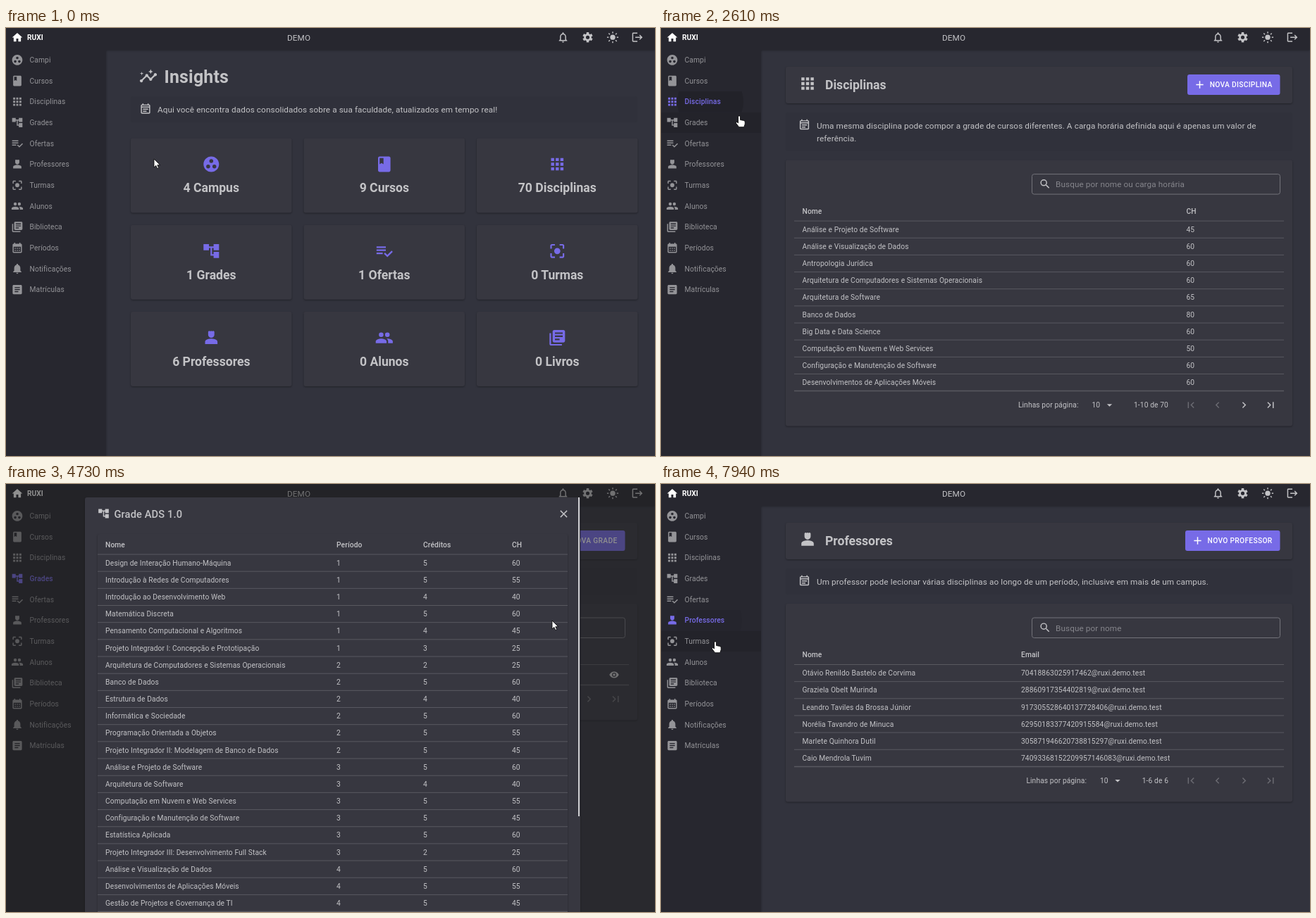
Write an HTML page that moves like this. It is 921 by 608 pixels and loops after 8000 ms.

```html
<!DOCTYPE html>
<html lang="pt-BR">
<head>
<meta charset="utf-8">
<title>Painel</title>
<style>
html, body { margin: 0; width: 100%; height: 100%; overflow: hidden; background: #32333d; }
#stage { display: block; width: 921px; height: 608px; font: 10.26px Roboto, sans-serif; fill: #c3c3c6; }
text { white-space: pre; }
.cell { letter-spacing: .01071em; }
.head { font-weight: 500; letter-spacing: .01071em; }
.brand { font-weight: 700; fill: #fff; }
.btn { font-weight: 500; letter-spacing: .02857em; fill: #fff; }
.body { font-size: 11.72px; letter-spacing: .00938em; }
.h6 { font-size: 14.65px; font-weight: 500; letter-spacing: .0075em; }
.h5 { font-size: 17.58px; font-weight: 700; }
.h4 { font-size: 24.91px; font-weight: 700; letter-spacing: .00735em; }
.mid { text-anchor: middle; }
.end { text-anchor: end; }
.card { fill: #373740; filter: drop-shadow(0 1px 1.2px rgba(0, 0, 0, .35)); }
.alert { fill: #30313b; }
.line { stroke: #fff; stroke-opacity: .17; }
.main { fill: #776be7; }
.dim { fill: #85858b; }
.off { fill: #6b6b72; }
.white { fill: #fff; }
.menu { fill: #949498; }
.menu .on { fill: #776be7; font-weight: 500; }
</style>
</head>
<body>
<svg id="stage" viewBox="0 0 921 608"></svg>
<script>
const SIZE = { body: 11.72, h6: 14.65, h5: 17.58, h4: 24.91 };
const ROW = 24.15, NAV = 29.65, UNIT = .7327, BIG = 1.1;

const ICON = {
  home: 'M10 20v-6h4v6h5v-8h3L12 3 2 12h3v8z',
  group: 'M12 2C6.48 2 2 6.48 2 12s4.48 10 10 10 10-4.48 10-10S17.52 2 12 2zM8 17.5a2.5 2.5 0 1 1 0-5 2.5 2.5 0 0 1 0 5zM12 10.5a2.5 2.5 0 1 1 0-5 2.5 2.5 0 0 1 0 5zM16 17.5a2.5 2.5 0 1 1 0-5 2.5 2.5 0 0 1 0 5z',
  book: 'M18 2H6c-1.1 0-2 .9-2 2v16c0 1.1.9 2 2 2h12c1.1 0 2-.9 2-2V4c0-1.1-.9-2-2-2zM6 4h5v8l-2.5-1.5L6 12V4z',
  apps: [4, 10, 16].map(x => [4, 10, 16].map(y => `M${x} ${y}h4v4h-4z`).join('')).join(''),
  tree: 'M22 11V3h-7v3H9V3H2v8h7V8h2v10h4v3h7v-8h-7v3h-2V8h2v3z',
  check: 'M14 10H2v2h12v-2zm0-4H2v2h12V6zM2 16h8v-2H2v2zm19.5-4.5L23 13l-6.99 7-4.51-4.5L13 14l3.01 3 5.49-5.5z',
  person: 'M18.39 14.56C16.71 13.7 14.53 13 12 13c-2.53 0-4.71.7-6.39 1.56C4.61 15.07 4 16.1 4 17.22V20h16v-2.78c0-1.12-.61-2.15-1.61-2.66zM12 12c2.21 0 4-1.79 4-4V4.5c0-.83-.67-1.5-1.5-1.5-.52 0-.98.27-1.25.67C12.98 3.27 12.52 3 12 3s-.98.27-1.25.67C10.48 3.27 10.02 3 9.5 3 8.67 3 8 3.67 8 4.5V8c0 2.21 1.79 4 4 4z',
  focus: 'M12 8a4 4 0 1 0 0 8 4 4 0 0 0 0-8zM5 15H3v4c0 1.1.9 2 2 2h4v-2H5v-4zM5 5h4V3H5c-1.1 0-2 .9-2 2v4h2V5zm14-2h-4v2h4v4h2V5c0-1.1-.9-2-2-2zm0 16h-4v2h4c1.1 0 2-.9 2-2v-4h-2v4z',
  people: 'M16 11a3 3 0 1 0-3-3 3 3 0 0 0 3 3zM8 11a3 3 0 1 0-3-3 3 3 0 0 0 3 3zm0 2c-2.33 0-7 1.17-7 3.5V19h14v-2.5c0-2.33-4.67-3.5-7-3.5zm8 0c-.29 0-.62.02-.97.05 1.16.84 1.97 1.97 1.97 3.45V19h6v-2.5c0-2.33-4.67-3.5-7-3.5z',
  shelf: 'M4 6H2v14c0 1.1.9 2 2 2h14v-2H4V6zm16-4H8c-1.1 0-2 .9-2 2v12c0 1.1.9 2 2 2h12c1.1 0 2-.9 2-2V4c0-1.1-.9-2-2-2zm-1 9H9V9h10v2zm-4 4H9v-2h6v2zm4-8H9V5h10v2z',
  month: 'M19 4h-1V2h-2v2H8V2H6v2H5c-1.1 0-2 .9-2 2v14c0 1.1.9 2 2 2h14c1.1 0 2-.9 2-2V6c0-1.1-.9-2-2-2zm0 16H5V10h14v10zM9 14H7v-2h2v2zm4 0h-2v-2h2v2zm4 0h-2v-2h2v2zm-8 4H7v-2h2v2zm4 0h-2v-2h2v2zm4 0h-2v-2h2v2z',
  bell: 'M12 22c1.1 0 2-.9 2-2h-4c0 1.1.89 2 2 2zm6-6v-5c0-3.07-1.64-5.64-4.5-6.32V4c0-.83-.67-1.5-1.5-1.5s-1.5.67-1.5 1.5v.68C7.63 5.36 6 7.92 6 11v5l-2 2v1h16v-1l-2-2z',
  article: 'M19 3H5c-1.1 0-2 .9-2 2v14c0 1.1.9 2 2 2h14c1.1 0 2-.9 2-2V5c0-1.1-.9-2-2-2zm-5 14H7v-2h7v2zm3-4H7v-2h10v2zm0-4H7V7h10v2z',
  note: 'M19 4h-1V2h-2v2H8V2H6v2H5c-1.1 0-2 .9-2 2v14c0 1.1.9 2 2 2h14c1.1 0 2-.9 2-2V6c0-1.1-.9-2-2-2zm0 16H5V10h14v10zm0-12H5V6h14v2zM7 12h10v2H7zm0 4h7v2H7z',
  chart: 'M21 8c-1.45 0-2.26 1.44-1.93 2.51l-3.55 3.56c-.3-.09-.74-.09-1.04 0l-2.55-2.55C12.27 10.45 11.46 9 10 9c-1.45 0-2.27 1.44-1.93 2.52l-4.56 4.55C2.44 15.74 1 16.55 1 18c0 1.1.9 2 2 2 1.45 0 2.26-1.44 1.93-2.51l4.55-4.56c.3.09.74.09 1.04 0l2.55 2.55C12.73 16.55 13.54 18 15 18c1.45 0 2.27-1.44 1.93-2.52l3.56-3.55C21.56 12.26 23 11.45 23 10c0-1.1-.9-2-2-2zM15 9l.94-2.07L18 6l-2.06-.93L15 3l-.92 2.07L12 6l2.08.93zM3.5 11L4 9l2-.5L4 8l-.5-2L3 8l-2 .5L3 9z',
  exit: 'M17 7l-1.41 1.41L18.17 11H8v2h10.17l-2.58 2.58L17 17l5-5zM4 5h8V3H4c-1.1 0-2 .9-2 2v14c0 1.1.9 2 2 2h8v-2H4V5z',
  search: 'M15.5 14h-.79l-.28-.27C15.41 12.59 16 11.11 16 9.5a6.5 6.5 0 1 0-6.5 6.5c1.61 0 3.09-.59 4.23-1.57l.27.28v.79l5 4.99L20.49 19zM9.5 14a4.5 4.5 0 1 1 0-9 4.5 4.5 0 0 1 0 9z',
  eye: 'M12 4.5C7 4.5 2.73 7.61 1 12c1.73 4.39 6 7.5 11 7.5s9.27-3.11 11-7.5c-1.73-4.39-6-7.5-11-7.5zM12 17a5 5 0 1 1 0-10 5 5 0 0 1 0 10zm0-8a3 3 0 1 0 0 6 3 3 0 0 0 0-6z',
  first: 'M18.41 16.59L13.82 12l4.59-4.59L17 6l-6 6 6 6zM6 6h2v12H6z',
  prev: 'M15.41 7.41L14 6l-6 6 6 6 1.41-1.41L10.83 12z',
  next: 'M10 6L8.59 7.41 13.17 12l-4.58 4.59L10 18l6-6z',
  last: 'M5.59 7.41L10.18 12l-4.59 4.59L7 18l6-6-6-6zM16 6h2v12h-2z',
  plus: 'M19 13h-6v6h-2v-6H5v-2h6V5h2v6h6z',
  close: 'M19 6.41L17.59 5 12 10.59 6.41 5 5 6.41 10.59 12 5 17.59 6.41 19 12 13.41 17.59 19 19 17.59 13.41 12z',
  drop: 'M7 10l5 5 5-5z'
};
ICON.bellLine = ICON.bell + 'm-2 1H8v-6c0-2.48 1.51-4.5 4-4.5s4 2.02 4 4.5v6z';

// All helpers take the vertical centre of what they draw.
const text = (x, y, s, cls = 'cell') => {
  const size = SIZE[cls.split(' ')[0]] || 10.26;
  return `<text x="${x}" y="${y + size * .355}" class="${cls}">${s}</text>`;
};
const at = (x, y, k, inner, cls = '') =>
  `<g transform="translate(${x - 12 * k} ${y - 12 * k}) scale(${k})" class="${cls}">${inner}</g>`;
const icon = (x, y, name, k = UNIT, cls = '') => at(x, y, k, `<path d="${ICON[name]}"/>`, cls);
const rect = (x, y, x2, y2, cls, r = 3) =>
  `<rect x="${x}" y="${y}" width="${x2 - x}" height="${y2 - y}" rx="${r}" class="${cls}"/>`;
const line = (x, x2, y, w = 1) =>
  `<path class="line" stroke-width="${w}" d="M${x} ${y}H${x2}"/>`;
const spokes = (n, r1, r2, w) => Array.from({ length: n }, (_, i) =>
  `<path d="M12 ${12 - r1}V${12 - r2}" stroke="#c3c3c6" stroke-width="${w}" transform="rotate(${i * 360 / n} 12 12)"/>`).join('');

function table(x, x2, top, cols, rows, h = ROW) {
  const xs = cols.map(c => c[0]);
  return cols.map(c => text(c[0], top - 14, c[1], 'head')).join('') + line(x, x2, top) +
    rows.map((row, i) =>
      row.split('|').map((s, j) => text(xs[j], top + h * (i + .5), s)).join('') +
      line(x, x2, top + h * (i + 1), i == rows.length - 1 ? 1.5 : 1)).join('');
}

function page({ icon: name, title, button, left, note, hint, cols, rows, range, h = ROW, extra = '' }) {
  const dy = 17.6 * (note.length - 1), end = 256.5 + dy + h * rows.length, y = end + 20;
  const wide = range.length > 8, sh = wide ? -11.5 : 0;
  return rect(177, 55, 896, 107, 'card') + icon(208, 79, name, BIG) + text(233, 80.5, title, 'h5') +
    rect(left, 66, 878.5, 95, 'main') + icon(left + 17.5, 80.5, 'plus', UNIT, 'white') +
    text(867.5, 80.5, button, 'btn end') +
    rect(177, 120, 896, 157 + dy, 'alert') + icon(203.5, 137, 'note') +
    note.map((s, i) => text(221, 139 + 17.6 * i, s, 'body')).join('') +
    rect(177, 170 + dy, 896, end + 50, 'card') +
    `<rect x="526.5" y="${190 + dy}" width="352" height="28.5" rx="3" fill="none" stroke="#73737a"/>` +
    icon(545, 204 + dy, 'search') + text(560, 204.5 + dy, hint, 'body dim') +
    table(189, 884, 256.5 + dy, cols, rows, h) + extra +
    text(604 + sh, y, 'Linhas por página:', 'cell end') + text(623 + sh, y, '10') +
    icon(648 + sh, y, 'drop') + text(720, y, range, 'cell end') +
    ['first', 'prev', 'next', 'last'].map((n, i) =>
      icon(752 + 37.7 * i, y, n, UNIT, wide && i > 1 ? '' : 'off')).join('');
}

const nav = [['group', 'Campi'], ['book', 'Cursos'], ['apps', 'Disciplinas'], ['tree', 'Grades'],
  ['check', 'Ofertas'], ['person', 'Professores'], ['focus', 'Turmas'], ['people', 'Alunos'],
  ['shelf', 'Biblioteca'], ['month', 'Períodos'], ['bell', 'Notificações'], ['article', 'Matrículas']];

const tiles = [['group', '4 Campus'], ['book', '9 Cursos'], ['apps', '70 Disciplinas'], ['tree', '1 Grades'],
  ['check', '1 Ofertas'], ['focus', '0 Turmas'], ['person', '6 Professores'], ['people', '0 Alunos'], ['shelf', '0 Livros']];

const insights = icon(202, 68.5, 'chart', BIG) + text(224.5, 69.5, 'Insights', 'h4') +
  rect(177, 97, 896, 134, 'alert') + icon(198, 114.5, 'note') +
  text(215, 116, 'Aqui você encontra dados consolidados sobre a sua faculdade, atualizados em tempo real!', 'body') +
  tiles.map(([name, s], i) => {
    const x = 177 + 245.5 * (i % 3), y = 156.5 + 123.3 * Math.floor(i / 3);
    return rect(x, y, x + 228.5, y + 106, 'card') + icon(x + 114.3, y + 37, name, BIG, 'main') +
      text(x + 114.3, y + 70.7, s, 'h5 mid');
  }).join('');

const host = '@ruxi.demo.test';
const pages = [
  page({ icon: 'group', title: 'Campi', button: 'NOVO CAMPUS', left: 760, hint: 'Busque por nome',
    note: ['Cada campus pode ofertar cursos diferentes a cada período.'],
    cols: [[200.5, 'Nome'], [686, 'Turno']], range: '1-4 de 4',
    rows: ['Agreste|Noturno', 'Litoral|Noturno', 'Mata|Matutino', 'Sertão|Noturno'] }),
  page({ icon: 'book', title: 'Cursos', button: 'NOVO CURSO', left: 769, hint: 'Busque por nome ou tipo',
    note: ['Note que um mesmo curso pode ser ofertado em mais de um campus.'],
    cols: [[200.5, 'Nome'], [686, 'Tipo']], range: '1-9 de 9',
    rows: ['Administração|Mestrado', 'Análise e Desenvolvimento de Sistemas|Bacharelado',
      'Arquitetura e Urbanismo|Tecnólogo', 'Ciência da Computação|Bacharelado', 'Direito|Licenciatura',
      'Engenharia Civil|Bacharelado', 'Engenharia de Produção|Pós-Doutorado',
      'Engenharia Mecânica|Bacharelado', 'Pedagogia|Licenciatura'] }),
  page({ icon: 'apps', title: 'Disciplinas', button: 'NOVA DISCIPLINA', left: 747, hint: 'Busque por nome ou carga horária',
    note: ['Uma mesma disciplina pode compor a grade de cursos diferentes. A carga horária definida aqui é apenas um valor de', 'referência.'],
    cols: [[200.5, 'Nome'], [745.5, 'CH']], range: '1-10 de 70',
    rows: ['Análise e Projeto de Software|45', 'Análise e Visualização de Dados|60', 'Antropologia Jurídica|60',
      'Arquitetura de Computadores e Sistemas Operacionais|60', 'Arquitetura de Software|65', 'Banco de Dados|80',
      'Big Data e Data Science|60', 'Computação em Nuvem e Web Services|50',
      'Configuração e Manutenção de Software|60', 'Desenvolvimentos de Aplicações Móveis|60'] }),
  page({ icon: 'tree', title: 'Grades', button: 'NOVA GRADE', left: 771, hint: 'Busque pelo nome do curso ou da grade',
    note: ['Um mesmo curso pode ter várias grades diferentes ao longo do tempo, com diferentes disciplinas.'],
    cols: [[200.5, 'Nome'], [381.5, 'Curso']], range: '1-1 de 1', h: 29,
    rows: ['Grade ADS 1.0|Análise e Desenvolvimento de Sistemas'], extra: icon(863, 271, 'eye', .61) }),
  page({ icon: 'check', title: 'Ofertas', button: 'NOVA OFERTA', left: 766, hint: 'Busque por qualquer atributo',
    note: ['Uma oferta de curso pode acontecer a cada período, com variações de campus e de turno.'],
    cols: [[200.5, 'Campus'], [322.5, 'Período'], [442.5, 'Turno'], [552, 'Curso'], [792.5, 'Grade']], range: '1-1 de 1',
    rows: ['Agreste|2024.1|Noturno|Análise e Desenvolvimento de Sistemas|Grade ADS 1.0'] }),
  page({ icon: 'person', title: 'Professores', button: 'NOVO PROFESSOR', left: 744, hint: 'Busque por nome',
    note: ['Um professor pode lecionar várias disciplinas ao longo de um período, inclusive em mais de um campus.'],
    cols: [[200.5, 'Nome'], [511, 'Email']], range: '1-6 de 6',
    rows: ['Otávio Renildo Bastelo de Corvima|70418863025917462', 'Graziela Obelt Murinda|28860917354402819',
      'Leandro Taviles da Brossa Júnior|917305528640137728406', 'Norélia Tavandro de Minuca|62950183377420915584',
      'Marlete Quinhora Dutil|305871946620738815297', 'Caio Mendrola Tuvim|74093368152209957146083'].map(s => s + host) }),
  insights
];

const modal = rect(112, 19, 815, 640, 'card') + icon(138.5, 42, 'tree') + text(153.5, 43, 'Grade ADS 1.0', 'h6') +
  icon(791.5, 42.5, 'close') + rect(130, 71, 797, 640, 'card') +
  table(130, 797, 100, [[141, 'Nome'], [469, 'Período'], [592, 'Créditos'], [718, 'CH']], [
    'Design de Interação Humano-Máquina|1|5|60', 'Introdução à Redes de Computadores|1|5|55',
    'Introdução ao Desenvolvimento Web|1|4|40', 'Matemática Discreta|1|5|60',
    'Pensamento Computacional e Algoritmos|1|4|45', 'Projeto Integrador I: Concepção e Prototipação|1|3|25',
    'Arquitetura de Computadores e Sistemas Operacionais|2|2|25', 'Banco de Dados|2|5|60',
    'Estrutura de Dados|2|4|40', 'Informática e Sociedade|2|5|60', 'Programação Orientada a Objetos|2|5|55',
    'Projeto Integrador II: Modelagem de Banco de Dados|2|5|45', 'Análise e Projeto de Software|3|5|60',
    'Arquitetura de Software|3|4|40', 'Computação em Nuvem e Web Services|3|5|55',
    'Configuração e Manutenção de Software|3|5|45', 'Estatística Aplicada|3|5|60',
    'Projeto Integrador III: Desenvolvimento Full Stack|3|2|25', 'Análise e Visualização de Dados|4|5|60',
    'Desenvolvimentos de Aplicações Móveis|4|5|55', 'Gestão de Projetos e Governança de TI|4|5|45'], 24.17) +
  '<rect x="812" y="19" width="2" height="453" fill="#cfcfd2"/>';

const stage = document.getElementById('stage');
stage.innerHTML = rect(0, 0, 921, 608, '', 0).replace('class=""', 'fill="#32333d"') +
  pages.map(p => `<g class="page">${p}</g>`).join('') +
  '<g style="filter:drop-shadow(0 1px 1.5px rgba(0,0,0,.3))" fill="#27272f"><path d="M0 0H921V31H142V608H0z"/></g>' +
  `<svg id="hover" width="142" height="${NAV}"><rect width="142" height="${NAV}" opacity=".1" fill="#000"/></svg>` +
  `<svg id="wave" width="142" height="${NAV}"><circle cy="${NAV / 2}" fill="#000"/></svg>` +
  '<g class="menu">' + nav.map(([name, s], i) =>
    `<g class="item">${icon(16, 45.4 + NAV * i, name)}${text(33.5, 45.4 + NAV * i, s)}</g>`).join('') + '</g>' +
  icon(16, 13.5, 'home', UNIT, 'white') + text(30, 13.5, 'RUXI', 'brand') + text(399, 13.5, 'DEMO', 'body') +
  icon(790.5, 13.3, 'bellLine') +
  at(825.5, 13.2, UNIT, '<circle cx="12" cy="12" r="5.4" fill="none" stroke="#c3c3c6" stroke-width="3.8"/>' + spokes(6, 6, 9.8, 4.8)) +
  at(861, 13.2, UNIT, '<circle cx="12" cy="12" r="5"/>' + spokes(8, 7.8, 11, 2)) +
  icon(896, 13.2, 'exit') +
  '<rect id="shade" width="921" height="608" fill="#212121"/>' + `<g id="modal">${modal}</g>` +
  '<g id="cursor" fill="#fff" stroke="#000" stroke-width=".8"><path d="M0 0v12l2.8-2.6 1.9 4.2 2-.9-1.9-4h3.9z"/>' +
  '<path d="M-1.5 1.2a1.5 1.5 0 0 1 3 0v4.3l5 1a2 2 0 0 1 1.7 2v3l-1.5 4.2h-7l-4-5.2q-.6-1.4.8-2l2 1.5z"/></g>';

const $ = id => document.getElementById(id);
const pageEls = stage.querySelectorAll('.page'), items = stage.querySelectorAll('.item');
const wave = $('wave').firstChild, [arrow, hand] = $('cursor').children;

const clicks = [[700, 72], [1620, 70], [2300, 70], [2980, 80], [6145, 64], [7180, 68]]; // time, ripple x
const OPEN = 4480, CLOSE = 5300;
const path = [[0, 210, 186], [100, 210, 186], [620, 80, 50], [1250, 80, 50], [1560, 79, 76], [1800, 79, 76],
  [2150, 82, 104], [2350, 84, 105], [2610, 111, 125], [2850, 108, 134], [3150, 108, 134], [3900, 800, 262],
  [4220, 849, 275], [4400, 863, 271], [4520, 863, 271], [4730, 775, 194], [5050, 791, 42], [5330, 791, 42],
  [6040, 66, 164], [6180, 66, 164], [6430, 73, 182], [6900, 72, 193], [7300, 72, 194], [7940, 77, 224], [8000, 77, 224]];

const clamp = v => Math.max(0, Math.min(1, v));
const show = (el, on) => el.style.display = on ? '' : 'none';

function pointer(t) {
  const i = path.findIndex(p => p[0] > t), [t0, x0, y0] = path[i - 1], [t1, x1, y1] = path[i];
  const u = (t - t0) / (t1 - t0), k = u * u * (3 - 2 * u);
  return [x0 + (x1 - x0) * k, y0 + (y1 - y0) * k];
}

function draw(t) {
  const current = clicks.filter(c => c[0] <= t).length - 1;
  pageEls.forEach((el, i) => show(el, i == (current < 0 ? 6 : current)));
  items.forEach((el, i) => el.classList.toggle('on', i == current));

  const [x, y] = pointer(t), fade = clamp((t - OPEN) / 150) * clamp(1 - (t - CLOSE) / 150);
  const overNav = x < 142 && y > 31 && !fade;
  show($('hover'), overNav);
  $('hover').setAttribute('y', 30.7 + NAV * Math.floor((y - 30.7) / NAV));

  show($('wave'), current >= 0);
  if (current >= 0) {
    const dt = t - clicks[current][0];
    $('wave').setAttribute('y', 30.7 + NAV * current);
    wave.setAttribute('cx', clicks[current][1]);
    wave.setAttribute('r', 47 * clamp(dt / 300));
    wave.setAttribute('opacity', .18 * clamp(1 - dt / 1000));
  }

  show($('shade'), fade > 0);
  show($('modal'), fade > 0);
  $('shade').setAttribute('opacity', .5 * fade);
  $('modal').setAttribute('opacity', fade);
  const k = .9 + .1 * fade;
  $('modal').setAttribute('transform', `translate(${463.5 * (1 - k)} ${304 * (1 - k)}) scale(${k})`);

  const point = overNav || Math.hypot(x - 863, y - 271) < 9 && !fade || Math.hypot(x - 791, y - 42) < 11 && fade;
  show(hand, point);
  show(arrow, !point);
  $('cursor').setAttribute('transform', `translate(${x} ${y})`);
}

function tick() {
  draw(performance.now() % 8000);
  requestAnimationFrame(tick);
}
tick();
</script>
</body>
</html>
```
